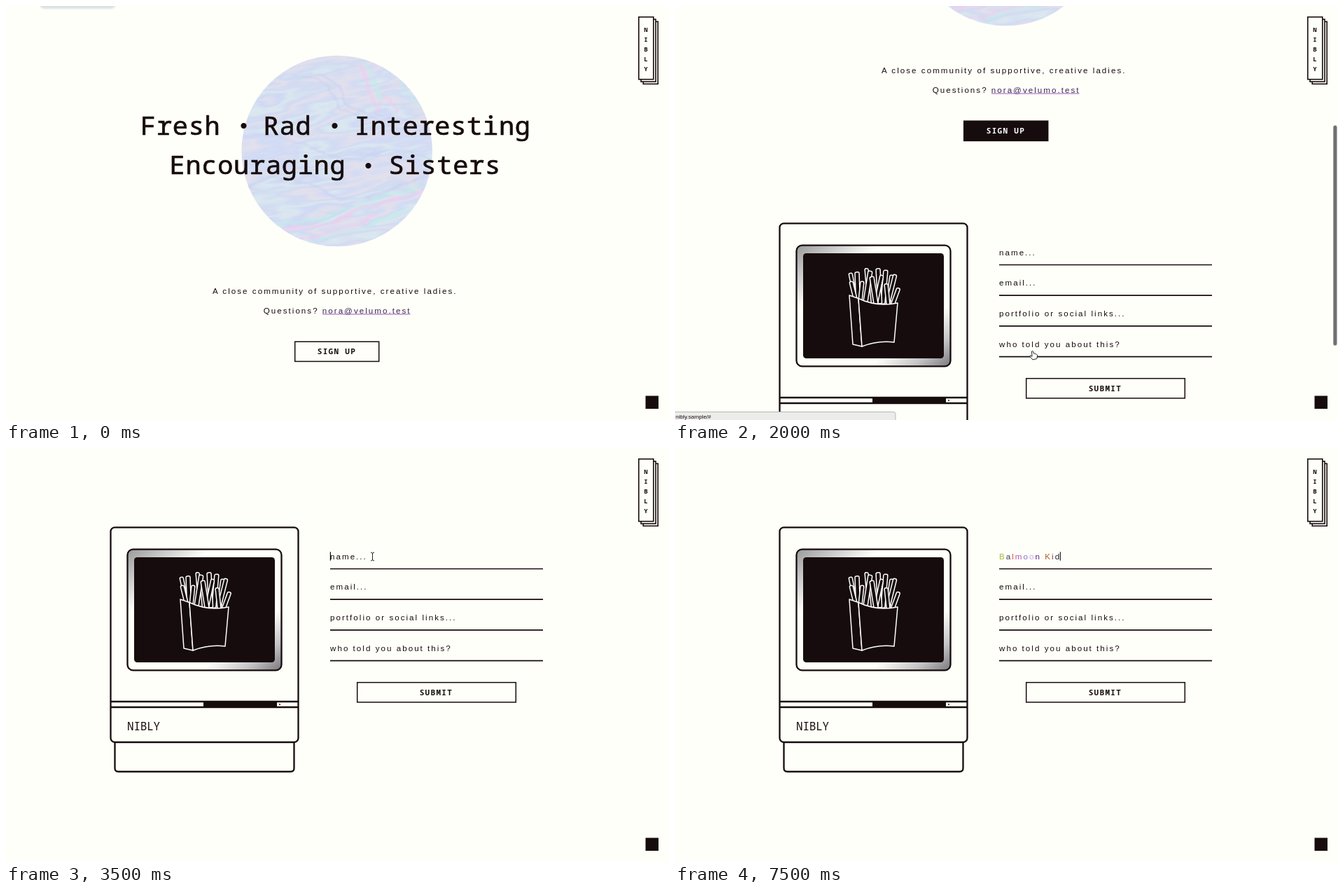
Animation of 947x591 px, one loop 8000 ms. Source, as an HTML page without scripts:

```html
<!DOCTYPE html>
<html lang="en">
<head>
<meta charset="utf-8">
<title>Community sign-up</title>
<style>
  :root { --paper: #fffffa; --ink: #170c0d; }
  html, body { margin: 0; width: 100%; height: 100%; overflow: hidden; background: var(--paper); }
  svg { display: block; width: 100%; height: 100%; }
  text { fill: var(--ink); white-space: pre; }
  .mono { font-family: "Noto Sans Mono", "DejaVu Sans Mono", monospace; }
  .sans { font: 11.6px "Liberation Sans", Arial, sans-serif; letter-spacing: 2.03px; }
  .title { font-size: 37px; letter-spacing: .7px; stroke: var(--ink); stroke-width: .7px; }
  .dot { font: 30px "Liberation Sans", Arial, sans-serif; text-anchor: middle; }
  .label { font-size: 11px; font-weight: 600; letter-spacing: 1.3px; }
  .tab { font-size: 9px; font-weight: 700; text-anchor: middle; }
  .box { fill: var(--paper); stroke: var(--ink); }
  .solid { fill: var(--ink); }
  .chalk { fill: var(--ink); stroke: #fff; stroke-width: 1.5; stroke-linejoin: round; }
  .pointer { fill: #fff; stroke: #222; stroke-width: 1; stroke-linejoin: round; }

  .page, .thumb, .fill, .flip, .intro, .status, .bar, .hand, .arrow, .beam, .hint, .typed, .caret, .cover {
    animation: 8s step-end infinite;
  }
  .page { animation-name: scroll; }
  .thumb { animation-name: thumb; }
  .fill { animation-name: fill; }
  .flip { animation-name: flip; }
  .intro { animation-name: intro; }
  .status { animation-name: status; }
  .bar { animation-name: bar; }
  .hand { animation-name: hand; }
  .arrow { animation-name: arrow; }
  .beam { animation-name: beam; }
  .hint { animation-name: hint; }
  .typed { animation-name: typed; }
  .cover { animation-name: type; }
  .caret { animation-name: type, tint, focus; }

  @keyframes scroll {
    0% { transform: none; }
    18.75% { transform: translateY(-63.6px); }
    25% { transform: translateY(-315px); }
    31.25% { transform: translateY(-512px); }
  }
  @keyframes thumb {
    0% { transform: translateY(36px); }
    25% { transform: translateY(170.5px); }
    31.25% { transform: translateY(277px); }
  }
  @keyframes type {
    0% { transform: none; }
    50% { transform: translateX(9.8px); }
    56.25% { transform: translateX(22.9px); }
    62.5% { transform: translateX(34.6px); }
    68.75% { transform: translateX(43.1px); }
    75% { transform: translateX(60px); }
    81.25% { transform: translateX(65.3px); }
    87.5% { transform: translateX(75px); }
    93.75% { transform: translateX(87px); }
  }
  @keyframes tint {
    0% { fill: #170c0d; }
    50% { fill: #a9b83c; }
    56.25% { fill: #e2562c; }
    62.5% { fill: #b352b4; }
    68.75% { fill: #8f72d2; }
    75% { fill: #5a2090; }
    87.5% { fill: #b9581c; }
    93.75% { fill: #24202e; }
  }
  @keyframes fill { 0% { fill: #fffffa; } 12.5% { fill: #170c0d; } }
  @keyframes flip { 0% { fill: #170c0d; } 12.5% { fill: #fff; } }
  @keyframes intro { 0% { visibility: visible; } 12.5% { visibility: hidden; } }
  @keyframes status { 0%, 37.5% { visibility: hidden; } 12.5% { visibility: visible; } }
  @keyframes bar { 0%, 37.5% { visibility: hidden; } 18.75% { visibility: visible; } }
  @keyframes hand { 0%, 31.25% { visibility: hidden; } 12.5% { visibility: visible; } }
  @keyframes arrow { 0%, 37.5% { visibility: hidden; } 31.25% { visibility: visible; } }
  @keyframes beam { 0%, 50% { visibility: hidden; } 37.5% { visibility: visible; } }
  @keyframes hint { 0% { visibility: visible; } 50% { visibility: hidden; } }
  @keyframes typed { 0% { visibility: hidden; } 50% { visibility: visible; } }
  @keyframes focus { 0% { visibility: hidden; } 43.75% { visibility: visible; } }
</style>
</head>
<body>
<svg viewBox="0 0 947 591">
  <defs>
    <clipPath id="disc"><circle cx="472.7" cy="207" r="136.3"/></clipPath>
    <filter id="marble" x="0" y="0" width="1" height="1" color-interpolation-filters="sRGB">
      <feTurbulence type="fractalNoise" baseFrequency=".006 .026" numOctaves="4" seed="8"/>
      <feColorMatrix values="1 0 0 0 0  1 0 0 0 0  1 0 0 0 0  0 0 0 0 1"/>
      <feComponentTransfer>
        <feFuncR type="table" tableValues=".82 .82 .88 .81 .86 .82 .89 .82 .86 .81 .88 .82 .82"/>
        <feFuncG type="table" tableValues=".86 .86 .88 .85 .91 .86 .88 .86 .91 .85 .88 .86 .86"/>
        <feFuncB type="table" tableValues=".95 .95 .93 .96 .94 .95 .93 .96 .94 .96 .93 .95 .95"/>
      </feComponentTransfer>
    </filter>
    <filter id="ripple" x="-.1" y="-.1" width="1.2" height="1.2" color-interpolation-filters="sRGB">
      <feTurbulence type="fractalNoise" baseFrequency=".03 .05" numOctaves="2" seed="3"/>
      <feDisplacementMap in="SourceGraphic" scale="16" xChannelSelector="R" yChannelSelector="G"/>
      <feGaussianBlur stdDeviation=".9"/>
    </filter>
    <filter id="soft"><feGaussianBlur stdDeviation="1.2"/></filter>
    <linearGradient id="bezel" x2="1" y2="1">
      <stop offset="0" stop-color="#999"/>
      <stop offset=".13" stop-color="#c9c9c9"/>
      <stop offset=".27" stop-color="#fffffa"/>
      <stop offset=".74" stop-color="#fffffa"/>
      <stop offset=".88" stop-color="#c4c4c6"/>
      <stop offset="1" stop-color="#77777c"/>
    </linearGradient>
  </defs>

  <rect width="947" height="591" fill="#fffffa"/>

  <g class="page">
    <g clip-path="url(#disc)">
      <rect x="300" y="30" width="350" height="360" transform="rotate(-9 473 207)" filter="url(#marble)"/>
      <g fill="none" stroke-width="4" opacity=".65" filter="url(#ripple)">
        <g stroke="#f3caee">
          <path d="M376 322Q440 318 490 298T612 262"/>
          <path d="M400 334Q470 326 530 300"/>
          <path d="M503 84Q520 106 528 150Q540 120 562 152"/>
          <path d="M536 78Q560 100 580 132"/>
        </g>
        <g stroke="#bdeee9">
          <path d="M384 314Q450 306 500 286T612 252"/>
          <path d="M440 334Q510 318 560 296T612 274"/>
          <path d="M512 82Q530 106 538 138"/>
          <path d="M548 92Q566 112 590 146"/>
        </g>
        <g stroke="#c4cdf2" stroke-width="2">
          <path d="M400 108Q446 90 462 120T500 156T590 178"/>
          <path d="M410 102Q456 86 472 116T510 150T600 170"/>
          <path d="M342 186Q400 182 440 204T530 214T610 222"/>
          <path d="M342 262Q400 230 450 262T600 240"/>
        </g>
      </g>
    </g>

    <g class="mono title">
      <text x="192" y="183.5">Fresh</text>
      <text x="367.6" y="183.5">Rad</text>
      <text x="497.8" y="183.5">Interesting</text>
      <text x="233.5" y="240">Encouraging</text>
      <text x="546.6" y="240">Sisters</text>
    </g>
    <text class="dot" x="339.5" y="181.3">•</text>
    <text class="dot" x="469.5" y="181.3">•</text>
    <text class="dot" x="517.5" y="237.8">•</text>

    <g class="sans">
      <text x="295" y="410.6">A close community of supportive, creative ladies.</text>
      <text x="367.7" y="438.6">Questions?</text>
      <text x="451.8" y="438.6" style="fill:#3b2852">nora@velumo.test</text>
    </g>
    <path d="M452 440H577.5" stroke="#9a55bd" stroke-width="1.2"/>

    <rect class="box fill" x="412.7" y="479.2" width="120" height="28.2" stroke-width="1.5"/>
    <text class="mono label flip" x="444.8" y="497.4">SIGN UP</text>

    <g transform="translate(0 512)">
      <g class="box" stroke-width="2.3">
        <path d="M155.5 420V457Q155.5 462 160.5 462H406.500Q411.500 462 411.500 457V420"/>
        <rect x="149.500" y="113.300" width="268" height="306.700" rx="6"/>
        <rect x="173.500" y="144.700" width="220" height="172.600" rx="8" style="fill:url(#bezel)"/>
        <path d="M149.500 362H417.500M149.500 370H417.500"/>
      </g>
      <rect class="solid" x="183" y="156" width="201" height="150" rx="4.500"/>
      <rect class="solid" x="282" y="362" width="105" height="8"/>
      <circle class="solid" cx="391" cy="366" r="1"/>
      <text class="mono" x="173" y="402.700" font-size="16" letter-spacing="-.2">NIBLY</text>

      <g class="chalk">
        <rect width="5" height="44" rx="2" transform="translate(248 185) rotate(-12)"/>
        <rect width="6" height="46" rx="2" transform="translate(307 187) rotate(8)"/>
        <rect width="5" height="50" rx="2" transform="translate(271 178) rotate(-5)"/>
        <rect width="6" height="48" rx="2" transform="translate(298 180) rotate(5)"/>
        <rect width="6" height="50" rx="2" transform="translate(287 178) rotate(-3)"/>
        <rect width="6" height="46" rx="2" transform="translate(257 183) rotate(-2)"/>
        <rect width="6" height="48" rx="2" transform="translate(276 181) rotate(9)"/>
        <rect width="5" height="44" rx="2" transform="translate(293 187) rotate(12)"/>
        <rect width="5" height="42" rx="2" transform="translate(312 186) rotate(14)"/>
        <rect width="6" height="40" rx="2" transform="translate(278 190) rotate(-9)"/>
        <rect width="5" height="34" rx="2" transform="translate(249 197) rotate(-14)"/>
        <rect width="5" height="30" rx="2" transform="translate(265 196) rotate(6)"/>
        <rect width="5" height="26" rx="2" transform="translate(317 205) rotate(20)"/>
        <rect width="5" height="32" rx="2" transform="translate(299 200) rotate(-6)"/>
        <path d="M249 216L262 220.500L267 289L254 286Z"/>
        <path d="M262 220.500Q288 233 318 227L313 283Q290 280 267 289Z"/>
      </g>

      <path d="M463 172.500H767M463 216.200H767M463 259.900H767M463 303.600H767" stroke="#170c0d" stroke-width="1.700"/>
      <g class="sans">
        <text class="hint" x="463" y="158.700">name...</text>
        <text x="463" y="202.400">email...</text>
        <text x="463" y="246.100">portfolio or social links...</text>
        <text x="463" y="289.800">who told you about this?</text>
        <g class="typed">
          <text x="463" y="158.700"><tspan fill="#a9b83c">B</tspan><tspan fill="#43395f">a</tspan><tspan fill="#e2562c">l</tspan><tspan fill="#b352b4">m</tspan><tspan fill="#8f72d2">o</tspan><tspan fill="#cfa9e2">o</tspan><tspan fill="#5a2090">n</tspan> <tspan fill="#b9581c">K</tspan><tspan fill="#7a3350">i</tspan><tspan fill="#24202e">d</tspan></text>
          <rect class="cover" x="463" y="146" width="110" height="17" fill="#fffffa"/>
        </g>
      </g>
      <rect class="caret" x="462.800" y="148.300" width="1.200" height="12.400"/>
      <rect class="box" x="501.700" y="334.700" width="226.600" height="28.200" stroke-width="1.500"/>
      <text class="mono label" x="590.700" y="353">SUBMIT</text>
    </g>
  </g>

  <rect class="intro" x="48" y="-12" width="109" height="16" rx="7" fill="#dde2e2" filter="url(#soft)"/>

  <g class="box" stroke-width="1.600">
    <rect x="910.200" y="22.300" width="21" height="89"/>
    <rect x="907" y="19" width="21" height="89"/>
    <rect x="903.800" y="15.700" width="21" height="89"/>
  </g>
  <g class="mono tab">
    <text x="914" y="36.500">N</text>
    <text x="914" y="50.500">I</text>
    <text x="914" y="64.500">B</text>
    <text x="914" y="78.500">L</text>
    <text x="914" y="92.500">Y</text>
  </g>
  <rect class="solid" x="913.500" y="556.500" width="18.500" height="18.500"/>

  <g class="bar"><rect class="thumb" x="940.300" width="5.200" height="314" rx="2.600" fill="#707074"/></g>

  <g class="status">
    <path d="M-1 592V579.500H312Q315 579.500 315 582.500V592Z" fill="#ececea" stroke="#b5b5b5"/>
    <text x="1" y="588.600" font-size="8" font-family="Liberation Sans, Arial, sans-serif">nibly.sample/#</text>
  </g>

  <path class="pointer hand" d="M509.500 493Q510.500 491.700 511.500 493L512.600 496.200Q514 495.500 514.600 496.700Q516 496.200 516.500 497.500Q517.800 497.600 517.600 499.500L516.800 503.500L511 505L507 500.500Q506.300 499 508 499L510 500.300Z"/>
  <path class="pointer arrow" d="M510 491.500V503L512.600 500.700L514.300 504.500L516 503.700L514.400 500.200H517.600Z" style="fill:#111;stroke:#fff;stroke-width:.6"/>
  <path class="beam" d="M521 149Q523.500 149 523.500 151V159Q523.500 161 521 161M526 149Q523.500 149 523.500 151M523.500 159Q523.500 161 526 161" fill="none" stroke="#222"/>
</svg>
</body>
</html>
```
